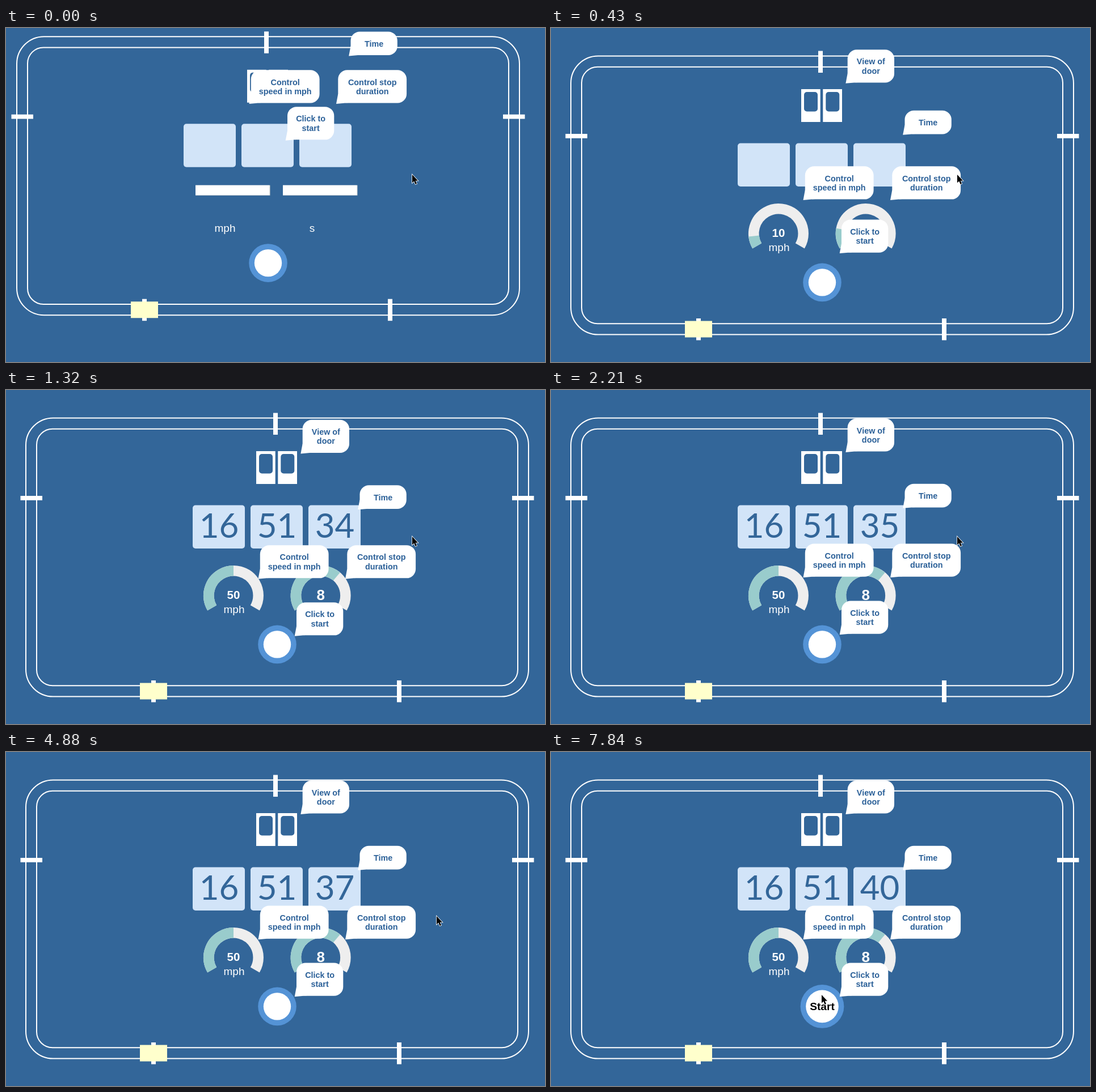
An HTML page with a canvas that plays this animation: 950x590 px, repeating every 7990 ms.

```html
<!DOCTYPE html>
<html lang="en">
<head>
<meta charset="utf-8">
<style>
  html, body { margin: 0; height: 100%; overflow: hidden; background: #336699; }
  canvas { display: block; }
</style>
</head>
<body>
<canvas id="stage" width="950" height="590"></canvas>
<script>
const ctx = document.getElementById('stage').getContext('2d');
const LOOP = 7990, LAYOUT = 140;
const BLUE = '#336699', INK = [43, 96, 152], ORANGE = [255, 148, 0];
const SANS = '"Liberation Sans", Arial, sans-serif';

const clamp = u => Math.max(0, Math.min(1, u));
const swing = u => 0.5 - 0.5 * Math.cos(Math.PI * clamp(u));

function box(x, y, w, h, color, r = 0) {
  ctx.fillStyle = color;
  ctx.beginPath();
  ctx.roundRect(x, y, w, h, r);
  ctx.fill();
}

function disc(x, y, r, color) {
  ctx.fillStyle = color;
  ctx.beginPath();
  ctx.arc(x, y, r, 0, 2 * Math.PI);
  ctx.fill();
}

function text(str, x, y, font, color) {
  ctx.font = font;
  ctx.fillStyle = color;
  ctx.textAlign = 'center';
  ctx.fillText(str, x, y);
}

function drawTrack() {
  ctx.strokeStyle = '#fff';
  ctx.lineWidth = 2;
  for (const [x, y, w, h, r] of [[35, 49.5, 886, 492, 48], [54, 68.7, 848, 453.5, 28]]) {
    ctx.beginPath();
    ctx.roundRect(x, y, w, h, r);
    ctx.stroke();
  }
  for (const [x, y] of [[471, 40.5], [256, 513], [689, 513]]) box(x, y, 8, 38.5, '#fff');
  for (const x of [25.5, 892]) box(x, 187, 38.5, 7.7, '#fff');
  box(236, 517.5, 48, 29, '#ffffcc');
}

function drawDoors() {
  for (const x of [441, 479.3]) {
    box(x, 108, 33.7, 58, '#fff');
    box(x + 5, 113, 24, 34.5, BLUE, 5);
  }
}

function drawClock(t) {
  const seconds = 35 + Math.floor((t - 2090) / 1000);
  [16, 51, seconds].forEach((n, i) => {
    box(329 + 102 * i, 203.5, 92, 76.5, '#d2e4f8', 5);
    if (t >= 1100) text(n, 375.5 + 102 * i, 260.5, '60px Lato, sans-serif', BLUE);
  });
}

function drawDial(x, value, max, size, baseline) {
  const start = Math.PI * 5 / 6, sweep = Math.PI * 4 / 3;
  const arc = (part, color) => {
    ctx.strokeStyle = color;
    ctx.beginPath();
    ctx.arc(x, 363, 43.7, start, start + sweep * part);
    ctx.stroke();
  };
  ctx.lineWidth = 18.5;
  arc(1, '#eeeeee');
  arc(value / max, '#99cccc');
  text(value, x, baseline, `bold ${size}px ${SANS}`, '#fff');
}

function drawControls(t) {
  if (t < LAYOUT) {
    for (const x of [350, 504]) {
      box(x, 312, 131.5, 18, '#ccc');
      box(x, 312, 130.5, 17.5, '#fff');
    }
  } else {
    const rise = swing((t - 135) / 1000);
    drawDial(401, Math.round(50 * rise), 100, 20.5, 369);
    drawDial(554.7, Math.ceil(8 * rise), 12, 26, 371);
  }
  text('mph', 402, 394, `19px ${SANS}`, '#fff');
  text('s', 555.5, 394, `19px ${SANS}`, '#fff');
}

function drawButton(t) {
  const grow = 4.6 * clamp((t - 7500) / 190);
  disc(478, 449.4, 33.8 + grow, '#5493d6');
  disc(478, 449.4, 24.2 + grow, '#fff');
  if (t >= 7640) text('Start', 478, 456, `bold 19.2px ${SANS}`, '#000');
}

// Bubbles drop in, overshoot by 5px, then settle.
function bubbleOffset(t, top) {
  if (t < 1170) return 5 - (71 + 0.359 * top) * Math.pow(1 - t / 1170, 3.6);
  return 5 * Math.pow(1 - clamp((t - 1170) / 750), 3);
}

function pulseColor(t) {
  const local = t < 3310 ? 0 : (t - 3310) % 3000;
  const k = swing(local / 500) - swing((local - 950) / 500);
  return `rgb(${INK.map((c, i) => Math.round(c + (ORANGE[i] - c) * k))})`;
}

function drawBubble(t, x, top, w, lines, color = `rgb(${INK})`) {
  const y = top + bubbleOffset(t, top), h = 25 + 16.6 * lines.length, bottom = y + h;
  box(x, y, w, h, '#fff', 16);
  ctx.beginPath();
  ctx.moveTo(x, bottom - 16);
  ctx.lineTo(x - 3.3, bottom + 1.4);
  ctx.lineTo(x + 18, bottom - 0.5);
  ctx.fill();
  lines.forEach((line, i) =>
    text(line, x + w / 2, y + 26.2 + 16.3 * i, `bold 14.4px ${SANS}`, color));
}

function drawBubbles(t) {
  drawBubble(t, 522.7, 50.3, 82.3, ['View of', 'door']);
  drawBubble(t, 623.5, 165.8, 82.3, ['Time']);
  drawBubble(t, 447.8, 271.6, 120.8, ['Control', 'speed in mph']);
  drawBubble(t, 601.3, 271.6, 120.8, ['Control stop', 'duration']);
  drawBubble(t, 512, 372.6, 82.3, ['Click to', 'start'], pulseColor(t));
}

const cursorPath = [
  [0, 716, 259], [4100, 716, 259], [4700, 759, 290], [4950, 759, 290], [5180, 755, 287],
  [5900, 738, 250], [6360, 712, 209], [6660, 691, 213], [7100, 690, 204], [7350, 680, 220],
  [7540, 605, 317], [7690, 482, 425], [7800, 477, 429], [LOOP, 477, 429]
];

function drawCursor(t) {
  const i = cursorPath.findIndex(p => p[0] > t);
  const [t0, x0, y0] = cursorPath[i - 1], [t1, x1, y1] = cursorPath[i];
  const k = (t - t0) / (t1 - t0);
  ctx.save();
  ctx.translate(x0 + (x1 - x0) * k, y0 + (y1 - y0) * k);
  const arrow = new Path2D('M0 0V14.5L3.3 11.6L5.6 17L8 16L5.7 10.8H10Z');
  ctx.lineWidth = 1.6;
  ctx.strokeStyle = '#fff';
  ctx.stroke(arrow);
  ctx.fillStyle = '#000';
  ctx.fill(arrow);
  ctx.restore();
}

function render(now) {
  const t = now % LOOP;
  box(0, 0, 950, 590, BLUE);
  ctx.save();
  if (t < LAYOUT) ctx.translate(-16, -34.3);
  drawTrack();
  drawDoors();
  drawClock(t);
  drawControls(t);
  drawButton(t);
  drawBubbles(t);
  ctx.restore();
  drawCursor(t);
  requestAnimationFrame(render);
}
requestAnimationFrame(render);
</script>
</body>
</html>
```
